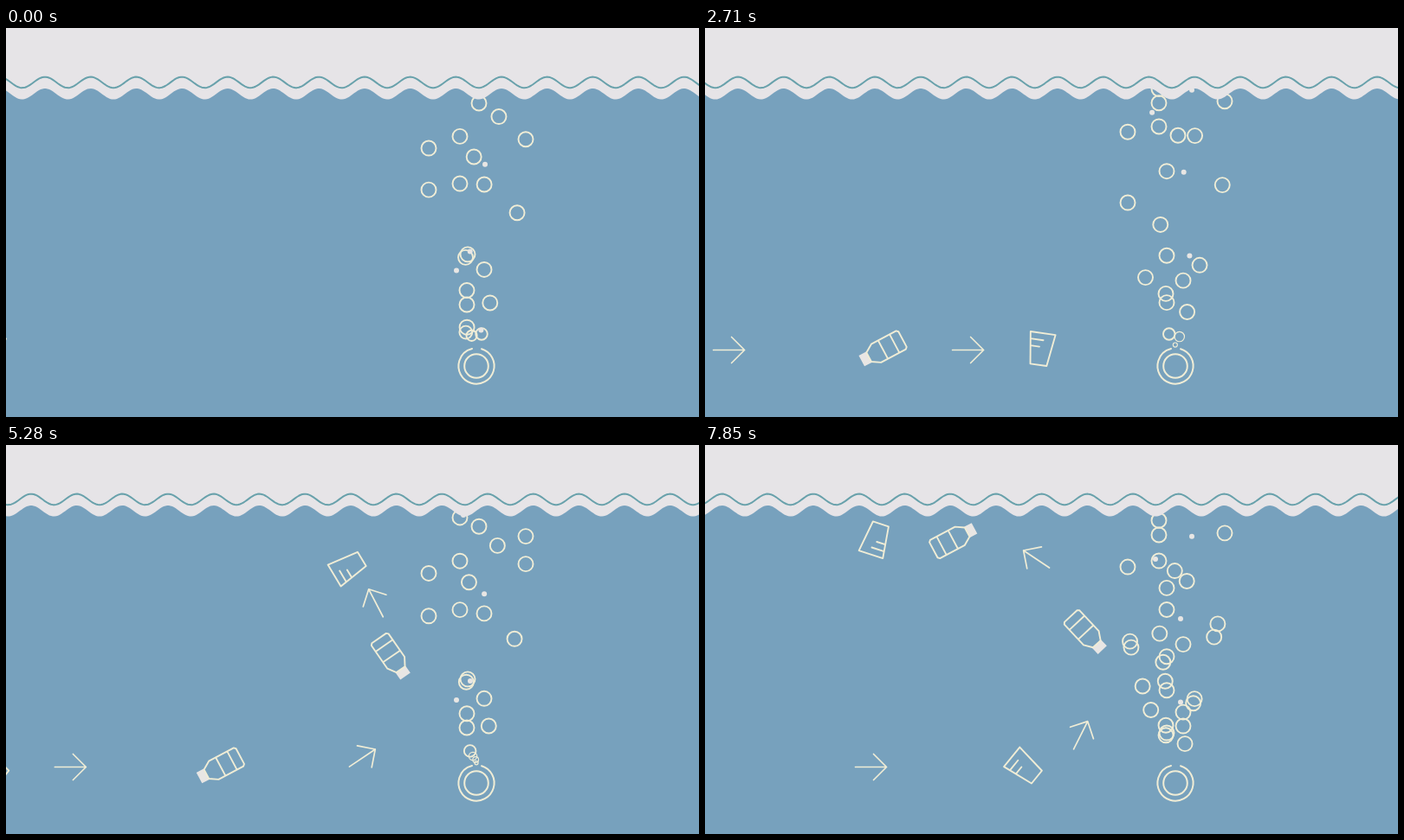
Recreate the animation shown at these times as an HTML page with a canvas. Size 800 by 450 pixels, loop 8000 ms.

```html
<!DOCTYPE html>
<html lang="en">
<head>
<meta charset="utf-8">
<title>Water cycle</title>
<style>
html, body { margin: 0; width: 100%; height: 100%; overflow: hidden; background: #e6e4e7; }
canvas { display: block; width: 100%; height: 100%; }
svg { position: absolute; visibility: hidden; }
</style>
</head>
<body>
<canvas id="stage" width="800" height="450"></canvas>
<svg width="0" height="0"><path id="route" d="M-400 372.5 H375 C430 372 447 320 447 268 C447 200 410 109 300 109 H-100"/></svg>
<script>
const ctx = document.getElementById('stage').getContext('2d');
const route = document.getElementById('route');
const LOOP = 8000, STEPS = 56, TAU = 2 * Math.PI;
const SKY = '#e6e4e7', WATER = '#77a1bd', SURFACE = '#68a1ab', CREAM = '#f0edd6', PALE = '#e8e6e4';
const rad = deg => deg * TAU / 360;
const clamp = (v, lo, hi) => Math.min(hi, Math.max(lo, v));
const mix = (a, b, s) => a + (b - a) * s;
const smooth = (from, to, v) => {
  const s = clamp((v - from) / (to - from), 0, 1);
  return s * s * (3 - 2 * s);
};

function circle(x, y, r, from = 0, to = 360) {
  ctx.beginPath();
  ctx.arc(x, y, r, rad(from), rad(to));
}

// A lane bends from its lower point to its upper point; all leave one source.
const SOURCE = { x: 543, y: 368 }, CYCLE = 5390, ECHO = 8820;
const lane = (xTop, yTop, xLow, yLow) => y =>
  mix(mix(xTop, xLow, smooth(yTop, yLow, y)), SOURCE.x, smooth(345, SOURCE.y, y));
const slowRise = age => .085 * age - 8 * Math.sin(age / 455);
const fastRise = age => .133 * age;
const dotRise = age => .138 * age;

// Births mark the passing of y = 322.
const bubbles = [
  { at: lane(488, 200, 530, 380), births: [-2060, -1560, 430, 1300, 2240] },
  { at: lane(524, 200, 532, 290), births: [-2220, -1630, -760, -270, -30, 350, 1550, 2500] },
  { at: lane(600, 150, 553, 365), births: [-2180, -1300, -60, 1100, 2060, 2810] },
  { at: lane(546, 135, 533, 165), births: [-2740, -1950, -800, 480, 940, 1930] },
  { at: lane(569, 100, 552, 185), births: [-1650, -1060, -320, 240, 1230, 2490], rise: fastRise }
];
const DOT_GAP = 1390;
const dots = [
  { at: lane(528, 90, 536, 280), first: -1850, count: 2 },
  { at: lane(516, 95, 520, 125), first: -300, count: 2 },
  { at: lane(553, 160, 549, 200), first: -1190, count: 4 },
  { at: lane(562, 250, 549, 297), first: 900, count: 2 }
];

function drawBubble(at, y) {
  if (y < 58 || y > SOURCE.y) return;
  const r = clamp(2 + (SOURCE.y - y) * .34, 2, 8.5);
  circle(at(y), y, r);
  ctx.lineWidth = r < 6 ? 1.2 : 1.9;
  ctx.stroke();
}

function drawDot(at, y) {
  if (y < 58 || y > 352) return;
  circle(at(y), y, 3);
  ctx.fillStyle = PALE;
  ctx.fill();
}

function drawColumn(t) {
  for (const { at, births, rise = slowRise } of bubbles)
    for (const birth of births)
      for (const delay of [0, CYCLE, ECHO]) drawBubble(at, 322 - rise(t - birth - delay));
  for (const { at, first, count } of dots)
    for (let i = 0; i < count; i++)
      for (const delay of [0, CYCLE]) drawDot(at, 322 - dotRise(t - first - i * DOT_GAP - delay));
}

function drawEmitter() {
  ctx.lineWidth = 2;
  circle(543, 391, 13.8);
  ctx.stroke();
  circle(543, 391, 20.6, -73, 256);
  ctx.stroke();
}

const line = (...pts) => pts.forEach(([x, y], i) => i ? ctx.lineTo(x, y) : ctx.moveTo(x, y));

const shapes = {
  cup() {
    line([-14.5, -18.5], [14.5, -18.5], [9.5, 18.5], [-9.5, 18.5]);
    ctx.closePath();
    line([-13.5, -10.5], [1.5, -10.5]);
    line([-12.3, -2.5], [-2, -2.5]);
  },
  bottle() {
    line([-6, -17.5], [-12, -8], [-12, 24.5], [-10, 26.5], [10, 26.5], [12, 24.5], [12, -8], [6, -17.5]);
    ctx.closePath();
    line([-12, 1], [12, 1]);
    line([-12, 16], [12, 16]);
    ctx.fillStyle = PALE;
    ctx.fillRect(-7, -27, 14, 9.5);
  },
  arrow() {
    line([-18, 0], [18, 0]);
    line([3, -15], [18, 0], [3, 15]);
  }
};

// Everything follows one route, turned with it; start is the passing of x = 204.
const drifters = [
  { kind: 'cup', start: 1490, turn: 18 },
  { kind: 'arrow', start: 2050, turn: 0 },
  { kind: 'bottle', start: 2710, turn: -118 },
  { kind: 'arrow', start: 3890, turn: 0 },
  { kind: 'bottle', start: 5000, turn: -118 },
  { kind: 'arrow', start: 6150, turn: 0 },
  { kind: 'cup', start: 6760, turn: -51 },
  { kind: 'arrow', start: 7940, turn: 0 }
];

// Steady on the bed, then slowing along the bend.
function travelled(age) {
  const bend = Math.max(0, age - 1400);
  return 604 + .15 * Math.min(age, 1400) + .113 * bend - 4.5e-6 * bend * bend;
}

function drawDrifter({ kind, start, turn }, t) {
  const age = t - start, way = travelled(age);
  if (way < 340) return;
  const { x, y } = route.getPointAtLength(way);
  const back = route.getPointAtLength(way - 2), ahead = route.getPointAtLength(way + 2);
  ctx.save();
  ctx.translate(x, y);
  ctx.rotate(Math.atan2(ahead.y - back.y, ahead.x - back.x) + rad(turn));
  if (kind === 'arrow') ctx.globalAlpha = clamp((5100 - age) / 800, 0, 1);
  ctx.lineWidth = kind === 'arrow' ? 1.7 : 1.9;
  ctx.beginPath();
  shapes[kind]();
  ctx.stroke();
  ctx.restore();
}

function drawSurface(t) {
  const length = 52.7, crest = 45 + t * .0169;
  const trace = mid => {
    for (let x = -4; x <= 804; x += 2) ctx.lineTo(x, mid - 6.3 * Math.cos((x - crest) / length * TAU));
  };
  ctx.beginPath();
  ctx.moveTo(-4, -4);
  trace(76.3);
  ctx.lineTo(804, -4);
  ctx.fillStyle = SKY;
  ctx.fill();
  ctx.beginPath();
  trace(62.9);
  ctx.strokeStyle = SURFACE;
  ctx.lineWidth = 2;
  ctx.stroke();
}

function draw(t) {
  ctx.fillStyle = WATER;
  ctx.fillRect(0, 0, 800, 450);
  ctx.strokeStyle = CREAM;
  ctx.lineCap = ctx.lineJoin = 'round';
  drawColumn(t);
  drawEmitter();
  drifters.forEach(item => drawDrifter(item, t));
  drawSurface(t);
}

// The motion advances in even steps, about seven a second.
const begin = performance.now();
function tick() {
  const ms = Math.max(0, performance.now() - begin) % LOOP;
  const step = Math.min(STEPS - 1, Math.floor((ms + 13) * STEPS / LOOP));
  draw(step * LOOP / STEPS);
  requestAnimationFrame(tick);
}
tick();
</script>
</body>
</html>
```
